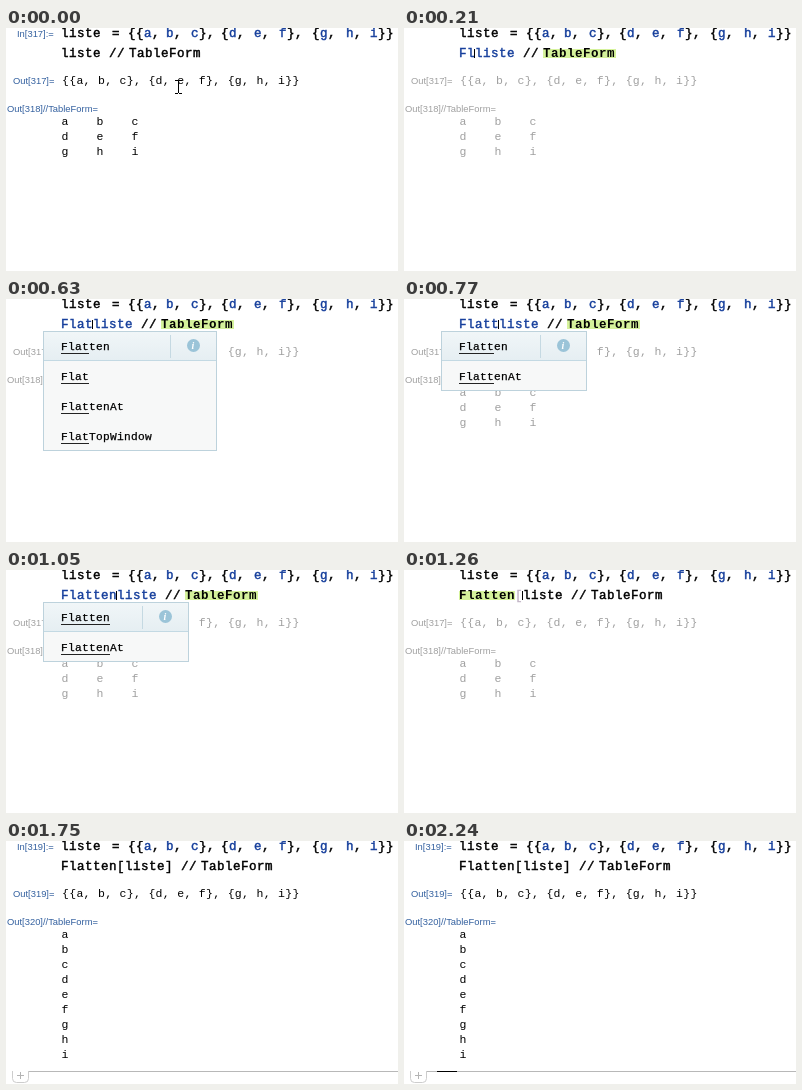
These frames come from a looping animation (392x243 px, 2.45 s). An HTML page with a canvas:

```html
<!DOCTYPE html>
<html lang="en">
<head>
<meta charset="utf-8">
<title>Flattening a list</title>
<style>
html, body { margin: 0; width: 100%; height: 100%; overflow: hidden; background: #fff; }
canvas { display: block; width: 392px; height: 243px; }
</style>
</head>
<body>
<canvas id="stage"></canvas>
<script>
const W = 392, H = 243, LOOP = 2450;
const canvas = document.getElementById('stage');
const ctx = canvas.getContext('2d');
const ratio = window.devicePixelRatio || 1;
canvas.width = Math.round(W * ratio);
canvas.height = Math.round(H * ratio);
ctx.scale(ratio, ratio);

const MONO = '"Liberation Mono", monospace';
const SANS = '"Liberation Sans", sans-serif';
// "spacing" opens the letters; "stroke" thickens a regular weight a little.
const INPUT = { font: `12.5px ${MONO}`, spacing: '0.5px', stroke: 0.45 };
const STRONG = { font: `bold 12.5px ${MONO}`, spacing: '0.5px' };
const OUTPUT = { font: `11.5px ${MONO}`, spacing: '0.3px' };
const MENU = { font: `11.2px ${MONO}`, spacing: '0.28px', stroke: 0.25 };
const LABEL = { font: `9.4px ${SANS}` };
const INFO = { font: 'italic bold 10px "Liberation Serif", serif' };

const BLACK = '#000', BLUE = '#163f9c', GREY = '#a0a0a0', LABEL_BLUE = '#33609f';
const GREEN = '#d5f29b';
const LEFT = 55, CELL = 8;

const names = ['Flatten', 'Flat', 'FlattenAt', 'FlashSelection', 'FlatTopWindow'];

// Each state holds from its time until the next one.
const states = [
  { at: 0, run: 317, typed: '', pointer: true },
  { at: 70, typed: 'F' },
  { at: 210, typed: 'Fl' },
  { at: 490, typed: 'Fla', menu: 'Fla' },
  { at: 560, typed: 'Flat', menu: 'Fla' },
  { at: 630, typed: 'Flat', menu: 'Flat' },
  { at: 700, typed: 'Flatt', menu: 'Flat' },
  { at: 770, typed: 'Flatt', menu: 'Flatt' },
  { at: 840, typed: 'Flatte', menu: 'Flatt' },
  { at: 910, typed: 'Flatte', menu: 'Flatte' },
  { at: 1050, typed: 'Flatten', menu: 'Flatten' },
  { at: 1260, typed: 'Flatten[', caret: 8, headMarked: true },
  { at: 1470, typed: 'Flatten[', caret: 13 },
  { at: 1610, typed: 'Flatten[', close: true, caret: 14 },
  { at: 1680, typed: 'Flatten[', close: true, run: 319, partial: true },
  { at: 1750, typed: 'Flatten[', close: true, run: 319, flat: true },
  { at: 2240, typed: 'Flatten[', close: true, run: 319, flat: true, bar: true }
];

function text(s, x, y, style, color) {
  ctx.font = style.font;
  ctx.letterSpacing = style.spacing || '0px';
  ctx.fillStyle = color;
  ctx.fillText(s, x, y);
  if (style.stroke) {
    ctx.strokeStyle = color;
    ctx.lineWidth = style.stroke;
    ctx.strokeText(s, x, y);
  }
}

function rect(x, y, w, h, color) {
  ctx.fillStyle = color;
  ctx.fillRect(x, y, w, h);
}

function assignment() {
  text('liste', LEFT, 9, INPUT, BLACK);
  text('=', 106, 9, INPUT, BLACK);
  const parts = ['{{a,', 'b,', 'c},', '{d,', 'e,', 'f},', '{g,', 'h,', 'i}}'];
  const xs = [122, 160, 185, 215, 248, 273, 306, 340, 364];
  parts.forEach((part, i) => {
    [...part].forEach((c, k) =>
      text(c, xs[i] + k * CELL, 9, INPUT, /[a-i]/.test(c) ? BLUE : BLACK));
  });
}

function expression(s) {
  const bracket = s.typed.endsWith('[');
  const shift = CELL * (s.typed.length + (s.close ? 1 : 0));
  const argX = LEFT + CELL * s.typed.length;
  const formX = 123 + shift;
  const color = s.typed && !bracket ? BLUE : BLACK;
  const headMarked = !s.run && s.headMarked;
  const formMarked = !s.run && !s.headMarked;

  if (headMarked) rect(LEFT, 21, 56, 9, GREEN);
  if (formMarked) rect(formX, 21, 73, 9, GREEN);
  text(s.typed.replace('[', ''), LEFT, 29, headMarked ? STRONG : INPUT, color);
  if (bracket) text('[', argX - CELL, 29, INPUT, s.close ? BLACK : '#c3b6c6');
  text('liste', argX, 29, INPUT, color);
  if (s.close) text(']', argX + 40, 29, INPUT, BLACK);
  text('//', 103 + shift, 29, INPUT, BLACK);
  text('TableForm', formX, 29, formMarked ? STRONG : INPUT, BLACK);
  if (!s.run) rect(LEFT + CELL * (s.caret || s.typed.length) - 1, 21, 1, 9, BLACK);
}

function results(s) {
  const run = s.run || 317;
  const ink = s.run ? BLACK : GREY;
  const tag = s.run ? LABEL_BLUE : GREY;
  if (s.run) text(`In[${run}]:=`, 11, 9, LABEL, tag);
  text(`Out[${run}]=`, 7, 56, LABEL, tag);
  text('{{a, b, c}, {d, e, f}, {g, h, i}}', LEFT + 1, 56, OUTPUT, ink);
  if (s.partial) return;
  text(`Out[${run + 1}]//TableForm=`, 1, 84, LABEL, tag);
  const columns = s.flat ? 1 : 3;
  [...'abcdefghi'].forEach((c, i) =>
    text(c, LEFT + 0.5 + 35 * (i % columns), 97 + 15 * Math.floor(i / columns), OUTPUT, ink));
}

function menu(prefix) {
  const items = names.filter(name => name.startsWith(prefix));
  const longest = Math.max(...items.map(name => name.length));
  const x = 37, y = 32, w = 83 + 7 * longest, h = 30 * items.length, right = x + w;
  rect(x, y, w, h, '#f7f8f8');
  const shade = ctx.createLinearGradient(0, y, 0, y + 30);
  shade.addColorStop(0, '#f1f6f8');
  shade.addColorStop(1, '#e5eef2');
  rect(x, y, w, 30, shade);
  rect(x, y + 29, w, 1, '#c3d9e3');
  rect(right - 47, y + 4, 1, 23, '#c5d9e2');
  ctx.strokeStyle = '#bdd2dc';
  ctx.lineWidth = 1;
  ctx.strokeRect(x + 0.5, y + 0.5, w - 1, h - 1);

  ctx.fillStyle = '#9bc4d8';
  ctx.beginPath();
  ctx.arc(right - 23.5, 46.5, 6.5, 0, Math.PI * 2);
  ctx.fill();
  text('i', right - 25.5, 50, INFO, '#fff');

  items.forEach((name, i) => {
    text(name, LEFT, 51 + 30 * i, MENU, BLACK);
    rect(LEFT, 54 + 30 * i, 7 * prefix.length, 1, '#222');
  });
}

function pointer() {
  rect(172, 53, 1, 12, BLACK);
  for (const y of [52, 65]) {
    rect(169, y, 3, 1, BLACK);
    rect(173, y, 3, 1, BLACK);
  }
}

function insertionPoint(bar) {
  rect(23, 230, W - 23, 1, '#b8b8b8');
  ctx.strokeStyle = '#cdcdcd';
  ctx.lineWidth = 1;
  ctx.beginPath();
  ctx.moveTo(6.5, 230);
  ctx.lineTo(6.5, 237.5);
  ctx.quadraticCurveTo(6.5, 241.5, 10.5, 241.5);
  ctx.lineTo(18.5, 241.5);
  ctx.quadraticCurveTo(22.5, 241.5, 22.5, 237.5);
  ctx.lineTo(22.5, 230);
  ctx.stroke();
  rect(11, 234, 7, 1, '#b4b4b4');
  rect(14, 231, 1, 7, '#b4b4b4');
  if (bar) rect(33, 230, 20, 1, BLACK);
}

function draw(time) {
  const s = states.filter(state => state.at <= time).pop();
  rect(0, 0, W, H, '#fff');
  assignment();
  expression(s);
  results(s);
  if (s.menu) menu(s.menu);
  if (s.pointer) pointer();
  if (s.flat) insertionPoint(s.bar);
}

const start = performance.now();
function tick() {
  draw((performance.now() - start) % LOOP);
  requestAnimationFrame(tick);
}
tick();
</script>
</body>
</html>
```
